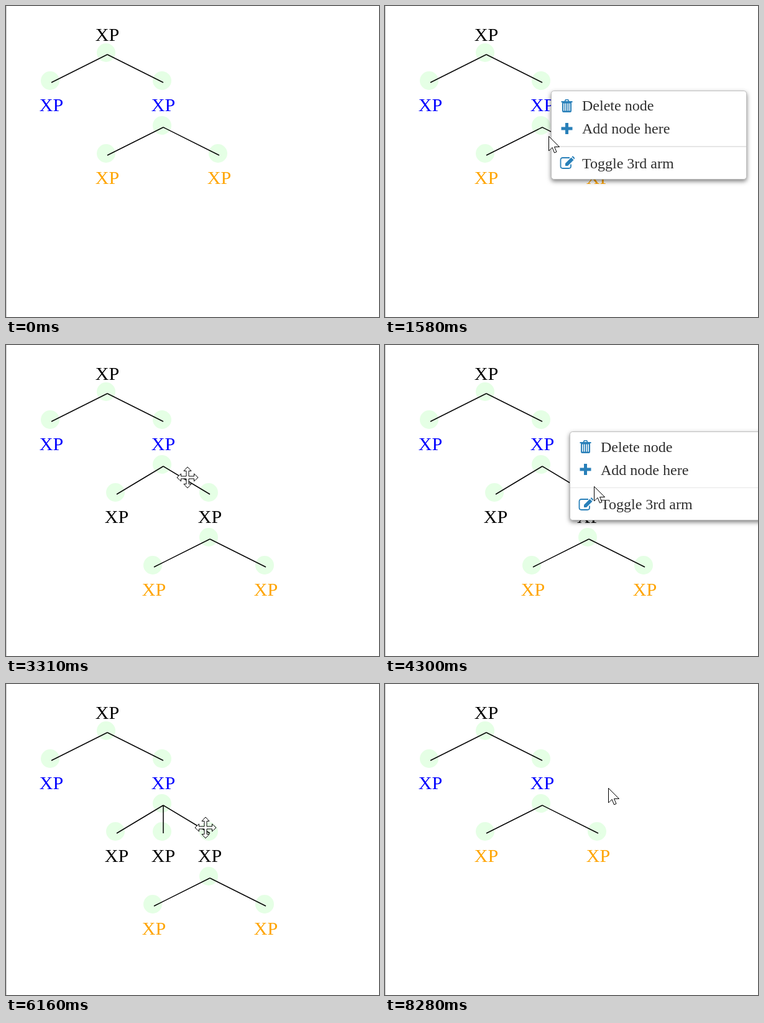
Animation of 600x500 px, one loop 8860 ms. Source, as an HTML page:

```html
<!DOCTYPE html>
<html lang="en">
<head>
<meta charset="utf-8">
<title>Tree editor</title>
<style>
  html, body { margin: 0; width: 100%; height: 100%; overflow: hidden; background: #fff; }
  body { position: relative; font: 24px "Liberation Serif", serif; }
  #stage, #pointer { position: absolute; left: 0; top: 0; width: 600px; height: 500px; }
  #stage text { font-size: 30px; text-anchor: middle; }
  #stage circle { fill: #e5ffe5; }
  #stage path { fill: none; stroke: #000; stroke-width: 1.5; }
  #pointer path { fill: #fff; stroke: #000; stroke-width: 1; }
  #menu {
    position: absolute; box-sizing: border-box; width: 315px; overflow: hidden;
    border: 1.5px solid #bebebe; border-radius: 4.8px; background: #fff;
    box-shadow: 0 3px 7.5px rgba(0, 0, 0, .5); color: #2f2f2f; white-space: nowrap;
  }
  .item { position: relative; height: 27.6px; line-height: 27.6px; padding: 4.8px 49px; }
  .item svg { position: absolute; left: 13px; top: 5px; width: 24px; height: 24px; color: #2980b9; }
  .item.on { background: #2980b9; color: #fff; }
  .item.on svg { color: #fff; }
  hr { border: 0; height: 1.5px; margin: 8.4px 0; background: #e6e6e6; }
</style>
</head>
<body>
<svg id="stage" viewBox="0 0 600 500"></svg>
<div id="menu">
  <div class="item"><svg viewBox="0 0 24 24"><path fill="currentColor" fill-rule="evenodd" d="M2.500 5H7.500L9 2H14L15.500 5H20.500V7H19V20.500Q19 23 17 23H6Q4 23 4 20.500V7H2.500ZM9.500 5H13.500L13 3.500H10ZM6 8.500V20.500H7.500V8.500ZM9 8.500V20.500H10.500V8.500ZM12.500 8.500V20.500H14V8.500ZM15.500 8.500V20.500H17V8.500Z"/></svg>Delete node</div>
  <div class="item"><svg viewBox="0 0 24 24"><path stroke="currentColor" stroke-width="5" d="M11.500 3V21M2.500 12H20.500"/></svg>Add node here</div>
  <hr>
  <div class="item"><svg viewBox="0 0 24 24"><path fill="none" stroke="currentColor" stroke-width="1.8" d="M16 4H5Q1.500 4 1.500 7.500V17.500Q1.500 21 5 21H14.500Q18 21 18 17.500V14.500"/><path fill="currentColor" d="M9 17V13L18.500 3.500L22.500 7.500L13 17ZM19.500 2.500L20.500 1.500Q21 1 21.500 1.500L24 4Q24.500 4.500 24 5L23.500 6.500Z"/></svg>Toggle 3rd arm</div>
</div>
<svg id="pointer" viewBox="0 0 600 500"><path id="shape"/></svg>
<script>
const LOOP = 8860;
const $ = id => document.getElementById(id);
const stage = $('stage'), menu = $('menu'), shape = $('shape');
const items = [...document.querySelectorAll('.item')];
const itemTops = [7.5, 44.1, 98.7], itemHeight = 36.6;

const shapes = {
  arrow: 'M.5 .5V24L6 18.500L9.500 27L13 25.500L9.500 17.500H17.500Z',
  hand: 'M-2 19V2Q-2 0 .5 0T3 2V11Q3 9 5.500 9T8 12Q8 10 10 10.500T12 14Q12 12 13.500 12.500T15 15' +
    'V21Q15 25 13 27V32H-1V28Q-7 21 -9 18Q-11 14 -7 14.500Q-5 15 -2 19ZM3 11V17M8 12V17M12 14V18',
  move: 'M0-17L6-10.500H2V-2H10.500V-6L17 0L10.500 6V2H2V10.500H6L0 17L-6 10.500H-2V2H-10.500V6' +
    'L-17 0L-10.500-6V-2H-2V-10.500H-6Z'
};

const swing = p => (1 - Math.cos(Math.PI * p)) / 2;
const quick = p => 1 - (1 - p) ** 2;
const late = p => p ** 1.5;
const span = (t, a, b) => Math.min(1, Math.max(0, (t - a) / (b - a)));

// Pointer legs: start, end, target x, target y, easing
const legs = [
  [20, 830, 260, 211, quick],
  [1570, 1580, 263, 209, swing],
  [1580, 2060, 329, 195, quick],
  [2700, 3370, 291, 213, swing],
  [3510, 3560, 291, 215, swing],
  [4180, 4300, 336, 227, late],
  [4300, 5070, 369, 255, quick],
  [5840, 6460, 278, 210, swing],
  [7110, 7250, 289, 210, late],
  [7250, 7760, 359, 167, quick]
];

const menus = [
  { x: 267, y: 135.5, open: 1080, opened: 1210, click: 2320, close: 2455, end: 2550 },
  { x: 297, y: 139, open: 3790, opened: 3910, click: 5085, close: 5185, end: 5270 },
  { x: 285, y: 138, open: 6620, opened: 6720, click: 8020, close: 8180, end: 8280 }
];

function pointerAt(t) {
  let x = 602, y = 246;
  for (const [from, to, tx, ty, ease] of legs) {
    if (t < from) break;
    const p = ease(span(t, from, to));
    x += (tx - x) * p;
    y += (ty - y) * p;
  }
  return [Math.round(x), Math.round(y)];
}

const label = (x, y, color) => `<text x="${x}" y="${y}" fill="${color}">XP</text>`;
const dot = (x, y) => `<circle cx="${x - 2}" cy="${y - 3}" r="15"/>`;

// A joint with its arms and the labels below them
function branch(x, y, ends, color) {
  return dot(x, y) + ends.map(e => dot(e, y + 45)).join('') +
    `<path d="${ends.map(e => `M${x} ${y}L${e} ${y + 45}`).join('')}"/>` +
    ends.map(e => label(e, y + 90.5, color)).join('');
}

function tree(grown, third) {
  const top = '<rect width="1" height="500" fill="#c4c4c4"/>' +
    label(163, 56, '#000') + branch(163, 78, [73, 253], '#00f');
  if (!grown) return top + branch(253, 195, [163, 343], 'orange');
  return top + branch(253, 195, third ? [178, 253, 328] : [178, 328], '#000') +
    branch(328, 312, [238, 418], 'orange');
}

let drawn;
function drawTree(t) {
  const grown = t >= menus[0].click && t < menus[2].click;
  const third = grown && t >= menus[1].click;
  const key = grown + 2 * third;
  if (key !== drawn) stage.innerHTML = tree(grown, third);
  drawn = key;
}

function draw(t) {
  drawTree(t);
  const [x, y] = pointerAt(t);
  const m = menus.find(m => t >= m.open && t < m.end);
  let hover = -1;
  menu.style.display = m ? 'block' : 'none';
  if (m) {
    let k = swing(span(t, m.open - 30, m.opened));
    if (t >= m.click) k = 1 - Math.max(.018, swing(span(t, m.close, m.end + 4)));
    menu.style.left = m.x + 'px';
    menu.style.top = m.y + 'px';
    menu.style.height = 3 + 140.1 * k + 'px';
    menu.style.paddingTop = 6 * k + 'px';
    if (t < m.click && x > m.x) {
      hover = itemTops.findIndex(top => y - m.y >= top && y - m.y < top + itemHeight);
    }
  }
  items.forEach((item, i) => item.classList.toggle('on', i === hover));
  const covered = m && t < m.close;
  const kind = hover >= 0 ? 'hand' : !covered && x < 347 ? 'move' : 'arrow';
  shape.setAttribute('d', shapes[kind]);
  shape.setAttribute('transform', `translate(${x} ${y})`);
}

const start = performance.now();
function frame() {
  draw((performance.now() - start) % LOOP);
  requestAnimationFrame(frame);
}
frame();
</script>
</body>
</html>
```
